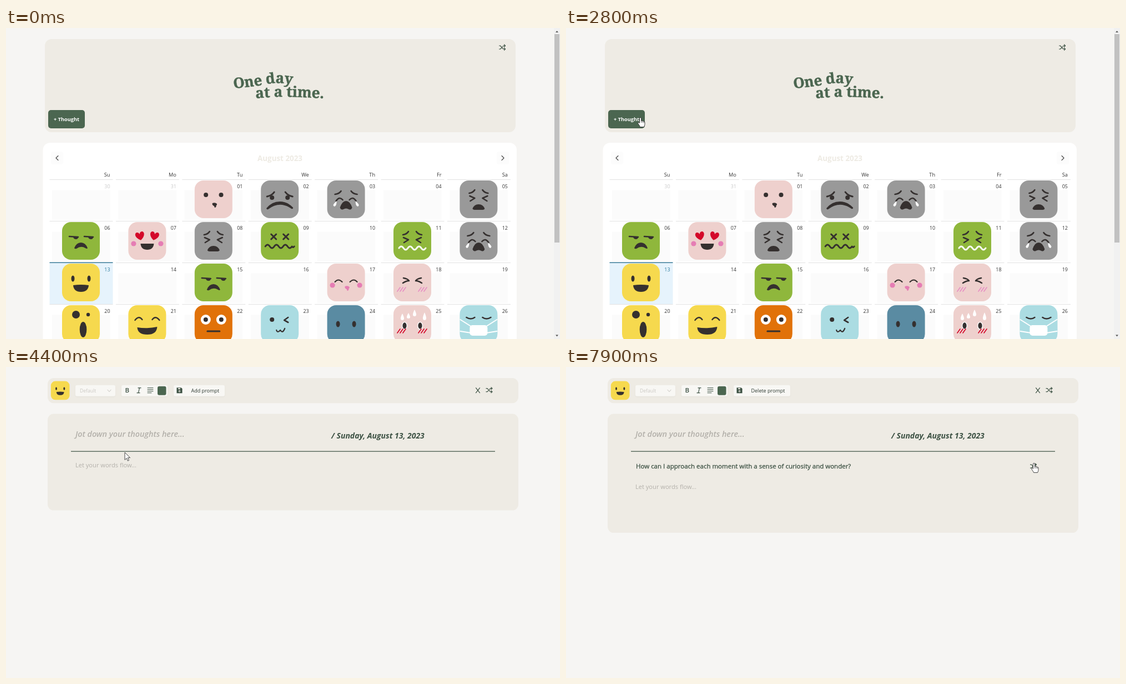
Animation of 998x561 px, one loop 8 s. Source, as an HTML page:

```html
<!DOCTYPE html>
<html lang="en">
<head>
<meta charset="utf-8">
<title>Mood journal</title>
<style>
  html, body { margin: 0; width: 100%; height: 100%; overflow: hidden; background: #f6f5f3; }
  svg { display: block; width: 100vw; height: 100vh; }
  text { font-family: "Open Sans", "Noto Sans", sans-serif; }
  .wave { font: 700 26px "Noto Serif", serif; fill: #4b6650; stroke: #4b6650; stroke-width: .5; }
</style>
</head>
<body>
<svg id="stage" viewBox="0 0 998 561"></svg>
<script>
const LOOP = 8000, STEP = 100;
const INK = '#35302f', GREEN = '#4b6650', DEEP = '#3c5143', SAND = '#eeebe4', PALE = '#f8f7f4';
const PINK = '#e57db4', RED = '#d4092a';

// Markup helpers
const fill = (d, c = INK) => `<path d="${d}" fill="${c}"/>`;
const line = (d, c = INK, w = 2.6) =>
  `<path d="${d}" fill="none" stroke="${c}" stroke-width="${w}" stroke-linecap="round" stroke-linejoin="round"/>`;
const oval = (x, y, rx, ry = rx, c = INK) => `<ellipse cx="${x}" cy="${y}" rx="${rx}" ry="${ry}" fill="${c}"/>`;
const box = (x, y, w, h, r, c, more = '') =>
  `<rect x="${x}" y="${y}" width="${w}" height="${h}" rx="${r}" fill="${c}" ${more}/>`;
const at = (x, y, s, more = '') => `<g transform="translate(${x} ${y}) ${more}">${s}</g>`;
const both = s => s + `<g transform="scale(-1 1)">${s}</g>`;
const text = (x, y, size, c, s, more = '') =>
  `<text x="${x}" y="${y}" font-size="${size}" fill="${c}" ${more}>${s}</text>`;

// Faces, drawn around the middle of a 68 px tile
const hatch = c => {
  const marks = line('M-27 16l5 -7m0 7l5 -7m0 7l5 -7', c, 1.7);
  return marks + at(38, 0, marks);
};
const kiss = c => fill('M-2 7Q3 5 6 8Q7 10 5 11Q5 15 2 15Q2 12 -1 11Q-3 9 -2 7Z', c);
const cheeks = both(oval(-24.5, 5, 4.6, 4.6, PINK));
const squint = both(line('M-17 -11Q-10 -12 -7 -17') + line('M-16 -6L-7 -2L-15 3'));
const waves = (x, y, n) => `M${x} ${y}q4 -6 8 0` + 't8 0'.repeat(n);
const heart = 'M0 8C-12 0 -8 -8 -4 -7Q-1 -7 0 -3Q1 -7 4 -7C8 -8 12 0 0 8Z';
const lid = line('M-21 -8L-5 -7') + fill('M-14 -7H-5Q-5 -3 -9 -3Q-13 -3 -14 -7Z');
const drop = (x, y, h) => at(x, y, fill(`M0 ${-h}Q6 ${h} 0 ${h}Q-6 ${h} 0 ${-h}Z`, '#fff'));

const faces = {
  wow: kiss(INK) + both(oval(-13.7, -8, 4)),
  worry: both(line('M-23 -5Q-14 -7 -10 -13', INK, 3) + oval(-14, -3, 4)) +
    fill('M-24 16Q-14 4 0 4Q14 4 24 15Q24 18 21 17Q0 2 -21 18Q-24 19 -24 16Z'),
  sob: both(line('M-20 -9Q-12 -10 -9 -15') + line('M-18 3Q-12 -6 -6 1') +
    fill('M-17 3Q-17 12 -21 13Q-25 11 -21 7Z', '#fff')) +
    fill('M-11 15Q-7 3 0 3Q7 3 11 15Q9 20 5 18Q0 15 -5 18Q-9 20 -11 15Z'),
  ouch: squint + fill('M-11 17Q-8 9 0 9Q8 9 11 17Q10 19 6 19H-6Q-10 19 -11 17Z'),
  queasy: squint + line(waves(-24, 13, 5), '#fff', 3),
  meh: lid + at(27, 0, lid) + fill('M-12 13Q-8 3 0 3Q8 3 12 13Q11 15 8 13Q0 8 -8 14Q-11 15 -12 13Z'),
  love: at(-13, -9, fill(heart, RED), 'rotate(-12)') + at(13, -9, fill(heart, RED), 'rotate(12)') +
    cheeks + fill('M-12 5H12Q11 16 0 16Q-11 16 -12 5Z'),
  dead: both(line('M-15.500 -12L-6.500 -3M-6.500 -12L-15.500 -3', INK, 3)) + line(waves(-26, 10, 5) + 'q2 3 4 0', INK, 3),
  happy: both(oval(-14.5, -7, 3, 5.5)) + fill('M-14 5Q0 3 14 5Q13 17 0 17Q-13 17 -14 5Z'),
  shy: both(line('M-20 -1Q-14 -8 -7 -1', INK, 2.2)) + cheeks + kiss(PINK),
  blush: both(line('M-16 -8Q-9 -7 -6 -3Q-11 -3 -17 1')) + hatch('#e690c3'),
  gasp: oval(-9, -17, 7) + oval(13, -17, 3.2) + oval(4, 10, 6.3, 14),
  grin: both(line('M-22 -7Q-15 -16 -9 -8', INK, 2.3)) + fill('M-18 6Q0 9 18 5Q17 19 0 19Q-17 19 -18 6Z'),
  stare: both(oval(-14, -8, 9, 9, '#fff') + oval(-14, -8, 4)) + line('M-11 13H11', INK, 3),
  wink: oval(-14, -8, 4) + line('M15 -12L8 -7L15 -3') + line('M-6 11Q-4 17 1 11Q5 18 9 8', INK, 2.2),
  blank: both(oval(-14.5, 0, 3.5, 5.5)),
  panic: drop(-18, -13, 6) + drop(-7, -15, 5) + drop(4, -20, 6) + drop(22, -14, 7) +
    both(oval(-14, 3, 5, 7, '#fff') + oval(-14, 3, 3.6, 5.7)) + hatch(RED),
  mask: both(line('M-22 -12Q-14 -7 -7 -12') + line('M-33 -8L-14 4M-33 13L-14 16', '#fff', 2)) +
    box(-16, 2, 32, 19, 5, '#fff')
};
const tints = { p: '#eed0cd', g: '#999', l: '#8fb73c', y: '#f6d94e', o: '#e17209', c: '#abdce2', b: '#5a8ba2' };
const tile = (x, y, name, tint, k = 1) =>
  at(x, y, box(-34, -34, 68, 68, 16, tints[tint]) + faces[name], `scale(${k})`);

// Icons
const shuffle = (x, y) => at(x, y, line('M-5.500 -3H-3.500L2 3H5M-5.500 3H-3.500L-1.500 1M0.500 -1L2 -3H5' +
  'M3.500 -5L5.500 -3L3.500 -1M3.500 1L5.500 3L3.500 5', DEEP, 1.2));
const disk = (x, y) => at(x, y, fill('M-5 -5H3L5 -3V5H-5Z', DEEP) + box(-2.5, -4, 4, 2, 0, SAND) +
  oval(0, 1.5, 1.8, 1.8, SAND) + oval(0, 1.5, 0.8, 0.8, DEEP));
const shade = 'style="filter:drop-shadow(0 1px 1px #0000000a)"';

const moods = ['2 0 wow p', '3 0 worry g', '4 0 sob g', '6 0 ouch g',
  '0 1 meh l', '1 1 love p', '2 1 ouch g', '3 1 dead l', '5 1 queasy l', '6 1 sob g',
  '0 2 happy y', '2 2 meh l', '4 2 shy p', '5 2 blush p',
  '0 3 gasp y', '1 3 grin y', '2 3 stare o', '3 3 wink c', '4 3 blank b', '5 3 panic p', '6 3 mask c'];

function calendar() {
  const colX = c => 78.5 + 119.4 * c, rowY = r => 273.5 + 75 * r;
  let s = box(70, 20, 848, 168, 12, SAND) + shuffle(894, 35) +
    '<path id="w1" d="M410 109C430 107 450 105 465 102S500 97 525 104" fill="none"/>' +
    '<path id="w2" d="M450 127Q475 124 500 124T590 128" fill="none"/>' +
    '<text class="wave"><textPath href="#w1">One day</textPath></text>' +
    '<text class="wave"><textPath href="#w2">at a time.</textPath></text>' +
    box(76, 148, 66, 33, 5, GREEN) +
    text(109, 168.3, 9.2, '#fff', '+ Thought', 'font-weight="700" text-anchor="middle"') +
    box(66.5, 207, 853.5, 380, 13, '#fff') +
    box(81, 223, 22, 23, 4, '#fcfcfc') + box(884, 223, 22, 23, 4, '#fcfcfc') +
    line('M94 230.500L90 234.500L94 238.500M893 230.500L897 234.500L893 238.500', '#444', 1.1) +
    text(493.5, 240, 13.4, SAND, 'August 2023', 'font-weight="700" text-anchor="middle"');
  ['Su', 'Mo', 'Tu', 'We', 'Th', 'Fr', 'Sa'].forEach((d, c) =>
    s += text(colX(c) + 109, 268, 9.2, '#333', d, 'text-anchor="end"'));
  for (let i = 0; i < 28; i++) {
    const c = i % 7, r = (i - c) / 7, x = colX(c), y = rowY(r), today = i === 14;
    const day = i < 2 ? 30 + i : String(i - 1).padStart(2, '0');
    s += box(x, y - .5, 114, today ? 75.5 : 1, 0, today ? '#e6f3fc' : '#e2e2e2');
    if (today) s += box(x, y - 1, 114, 1.5, 0, '#397a98');
    else s += box(x + 4.5, y + 19, 104.5, 54, 0, '#fbfbfb');
    if (i === 21) s += box(x, y + .5, 114, 75, 0, '#f3f2f0', 'id="hover"');
    s += text(x + 109, y + 15, 8.9, today ? '#28799d' : i < 2 ? '#c9c9c9' : '#333', day, 'text-anchor="end"');
  }
  for (const m of moods) {
    const [c, r, name, tint] = m.split(' ');
    s += tile(135 + 119.4 * c, 309 + 75 * r, name, tint);
  }
  return s + box(987, 0, 11, 561, 0, '#f1f1f1') + box(988, 11, 9, 376, 0, '#c1c1c1') +
    fill('M990 8L992.500 5L995 8Z', '#555') + fill('M990 553.500L992.500 556.500L995 553.500Z', '#555');
}

function editor() {
  const bar = tile(97.7, -.2, 'happy', 'y', .495) +
    box(125, -10, 72, 20, 3, PALE, shade) + text(133, 3.2, 8.6, '#cbc8c3', 'Default') +
    line('M183 -1.500L186 2L189 -1.500', '#c5c3be', 1) +
    box(208, -10, 83, 20, 3, PALE, shade) +
    text(218.3, 3.4, 11.5, DEEP, 'B', 'font-weight="600" text-anchor="middle"') +
    line('M238 -5H243M236 4H241M240.500 -5L238.500 4', DEEP, 1.2) +
    line('M255 -5H265M255 -2H265M255 1H265M255 4H262', DEEP, 1) +
    box(273, -8, 15.5, 16, 3, GREEN) +
    box(302, -10, 92, 20, 3, PALE, 'id="btn" ' + shade) + disk(312.5, -.5) +
    text(333.5, 3.4, 9, '#2c3830', '', 'id="label"') +
    line('M846.500 -5L853.500 4M853.500 -5L846.500 4', DEEP, 1.2) + shuffle(870.5, -1);
  const page = text(125, 41.6, 14.35, '#b3b0aa', 'Jot down your thoughts here...', 'font-weight="600" font-style="italic"') +
    text(586, 44.6, 14, DEEP, '/ Sunday, August 13, 2023', 'font-weight="700" font-style="italic"') +
    box(117, 67, 764, 1.2, 0, DEEP) +
    `<g id="prompt">${text(126, 98.2, 11.5, DEEP,
      'How can I approach each moment with a sense of curiosity and wonder?',
      `stroke="${DEEP}" stroke-width=".3"`)}${shuffle(842, 94.5)}</g>` +
    text(125, 96, 11.1, '#b3b0aa', 'Let your words flow...', 'id="body"');
  return box(75, 20, 848, 168, 11, SAND, 'id="top"') + `<g id="bar">${bar}</g>` +
    `<g id="page">${box(75, 0, 848, 174, 11, SAND, 'id="card"')}${page}</g>`;
}

const cursors =
  `<g id="arrow"><path d="M0 0V13.500L3.200 10.600L5.300 15.300L7.500 14.300L5.400 9.700H9.600Z" fill="#fff" stroke="#333" stroke-width=".9"/></g>` +
  `<g id="hand"><path d="M-1.500 10V1.500Q-1.500 0 0 0Q1.500 0 1.500 1.500V6Q3 5 4 6.500Q5.500 5.800 6.300 7.200Q8 6.800 8 9V12Q8 14 6.500 17H-.5Q-1 15 -3.800 11.500Q-5 9.500 -3.500 9Q-2.500 8.800 -1.500 10Z" fill="#fff" stroke="#333" stroke-width=".9" stroke-linejoin="round"/>` +
  line('M1.500 6V9M4 6.500V9.300M6.300 7.300V9.600', '#333', .7) + '</g>';

const stage = document.getElementById('stage');
stage.innerHTML = `<g id="cal">${calendar()}</g><g id="edit">${editor()}</g>${cursors}`;
const el = id => document.getElementById(id);
const set = (id, k, v) => el(id).setAttribute(k, v);
const show = (id, on) => set(id, 'display', on ? 'inline' : 'none');

// Pointer path: time, x, y
const track = [[900, 33, 514], [1100, 100, 526], [1400, 139, 529.5], [1600, 142, 520], [1700, 141, 474],
  [2100, 143, 350], [2600, 136, 173], [2700, 134, 161.5], [4100, 134, 161.5], [4400, 214, 154],
  [4600, 348, 85], [4800, 349, 82], [5400, 363, 45], [6300, 363, 45], [6700, 452, 165],
  [7200, 762, 182], [7600, 825, 178], [7900, 843, 173.5]];

function pointer(t) {
  const i = track.findIndex(k => k[0] >= t);
  if (i < 1) return track[i < 0 ? track.length - 1 : 0];
  const [t0, x0, y0] = track[i - 1], [t1, x1, y1] = track[i], p = (t - t0) / (t1 - t0);
  return [t, x0 + (x1 - x0) * p, y0 + (y1 - y0) * p];
}

function clickable(t, x, y) {
  if (t < 3500) return x > 78 && (y > 274 || y < 181);
  if (t < 4200) return true;
  return t < 7000 ? x > 302 && y < 54 : x > 833;
}

function draw(t) {
  const writing = t >= 3500, asked = t >= 5700;
  show('cal', !writing);
  show('edit', writing);
  show('hover', t >= 1100 && t < 1700);

  const p = Math.min(1, Math.max(0, (t - 3500) / 500));
  const h = 168 - 122.7 * p * p * (3 - 2 * p);
  set('top', 'height', h);
  set('bar', 'transform', `translate(0 ${20 + h / 2})`);
  set('page', 'transform', `translate(0 ${39.3 + h})`);
  set('card', 'height', asked ? 214.5 : 174);
  set('body', 'y', asked ? 135.5 : 96);
  set('btn', 'width', asked ? 102 : 92);
  el('label').textContent = asked ? 'Delete prompt' : 'Add prompt';
  show('prompt', asked);

  const [, x, y] = pointer(t);
  const seen = t >= 900 && !(t > 6700 && t < 7200), hand = clickable(t, x, y);
  show('arrow', seen && !hand);
  show('hand', seen && hand);
  set(hand ? 'hand' : 'arrow', 'transform', `translate(${x} ${y})`);
}

const start = performance.now();
function tick() {
  const t = (performance.now() - start) % LOOP;
  draw(Math.floor(t / STEP) * STEP);
  requestAnimationFrame(tick);
}
tick();
</script>
</body>
</html>
```
